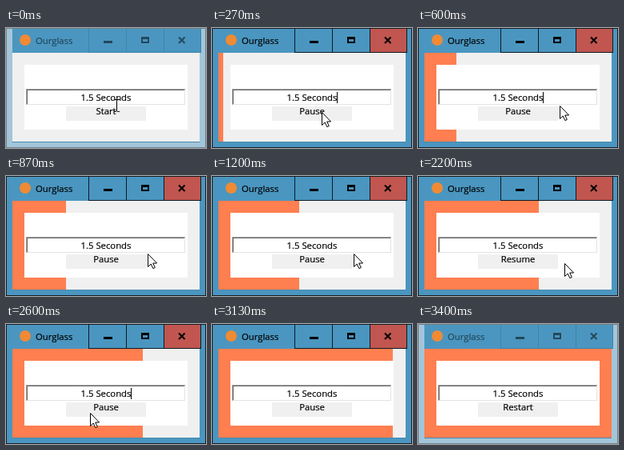
Write an HTML page that moves like this. It is 250 px wide and 150 px high and loops after 3540 ms.

```html
<!DOCTYPE html>
<html lang="en">
<head>
<meta charset="utf-8">
<title>Timer window</title>
<style>
  html, body { margin: 0; width: 100%; height: 100%; overflow: hidden; }
  svg { display: block; width: 100vw; height: 100vh; }
  text {
    font: 11.3px "Open Sans", "Noto Sans", sans-serif;
    fill: currentColor; stroke: currentColor; stroke-width: .2px;
  }
  .mid { text-anchor: middle; }
  .crisp { shape-rendering: crispEdges; }
  .line { fill: none; }
  #frame { fill: #4a96c0; }
  #close { fill: #c0564f; }
  #edge { stroke: #1e1e1e; }
  #seams { stroke: #0c1a22; }
  #glyphs { fill: none; stroke: #000; stroke-width: 2; }
  .idle #frame { fill: #a3c5d9; }
  .idle #close { fill: none; }
  .idle #edge { stroke: #70818b; }
  .idle #seams { stroke: #3f84aa; }
  .idle #glyphs { stroke: #24485c; }
  .idle #name { color: #24485c; }
</style>
</head>
<body>
<svg id="win" viewBox="0 0 250 150" preserveAspectRatio="none">
  <g class="crisp">
    <rect id="frame" width="250" height="150"/>
    <rect x="8" width="235" height="31" fill="#4a96c0"/>
    <rect id="close" x="197" width="46" height="30"/>
    <path id="seams" class="line" d="M103.5 0V30.5H243.5V0M150.5 0V30M197.5 0V30"/>
    <path class="line" stroke="#458bb0" d="M8 142.5H242"/>
    <rect id="edge" class="line" x=".5" y=".5" width="249" height="149"/>
  </g>
  <circle cx="24" cy="15" r="7" fill="#f08a35"/>
  <text id="name" x="37" y="20">Ourglass</text>
  <g id="glyphs">
    <path class="crisp" d="M122 17.5H133" stroke-width="3"/>
    <path class="crisp" d="M170 12H178V18H170ZM170 13H178"/>
    <path d="M216 11.5L223.5 19M223.5 11.5L216 19"/>
  </g>
  <g class="crisp">
    <rect x="8" y="31" width="234" height="111" fill="#f0f0f0"/>
    <rect id="bar" x="8" y="31" width="0" height="111" fill="#ff7f50"/>
    <rect x="23" y="46" width="204" height="81" fill="#fff"/>
    <rect x="75" y="98" width="100" height="18" fill="#f0f0f0"/>
    <path class="line" stroke="#a0a0a0" d="M25.5 96V76.5H224"/>
    <path class="line" stroke="#696969" d="M26.5 95V77.5H223"/>
    <path class="line" stroke="#e3e3e3" d="M26 95.5H223.5V77"/>
  </g>
  <text class="mid" x="125" y="91">1.5 Seconds</text>
  <rect id="caret" class="crisp" x="156" y="80" width="1" height="14"/>
  <text id="label" class="mid" x="125" y="108">Start</text>
  <path id="beam" class="crisp line" stroke="#000"
    d="M-3 -7.5H0M1 -7.5H4M.5 -7V7M-3 7.5H0M1 7.5H4"/>
  <path id="arrow" fill="#fff" stroke="#000" stroke-linejoin="round"
    d="M.5 .5V16.5L4.2 13L6.8 18.6L9.3 17.5L6.7 12H11.6Z"/>
</svg>
<script>
const LOOP = 3540, LAST = 3400, TICK = 200 / 3;
const START = 208, PAUSE = 1604, RESUME = 2398, BLUR = 3330;
const WIDTH = 234, SPEED = 0.1025, BLINK = 530, GLIDE = 260;

// Pointer stops, each with its arrival time.
const stops = [
  { at: 0, x: 138, y: 97 },
  { at: 200, x: 137, y: 105 },
  { at: 600, x: 177, y: 97 },
  { at: 1600, x: 137, y: 105 },
  { at: 1930, x: 193, y: 110 },
  { at: 2390, x: 137, y: 105 },
  { at: 2600, x: 105, y: 111 },
  { at: 2870, x: 50, y: 155 }
];

const $ = id => document.getElementById(id);
const show = (id, on) => $(id).setAttribute("visibility", on ? "visible" : "hidden");
const clamp = (v, lo, hi) => Math.min(hi, Math.max(lo, v));
const smooth = u => u * u * (3 - 2 * u);

// Steps fall on whole hundredths of a second.
const stepTime = k => Math.round(k * TICK / 10) * 10;
function snap(t) {
  const k = Math.round(t / TICK);
  return Math.min(LAST, stepTime(stepTime(k) > t ? k - 1 : k));
}

function pointerAt(t) {
  let { x, y } = stops[0];
  stops.slice(1).forEach((s, i) => {
    const from = Math.max(stops[i].at, s.at - GLIDE);
    const u = smooth(clamp((t - from) / (s.at - from), 0, 1));
    x += (s.x - x) * u;
    y += (s.y - y) * u;
  });
  return `translate(${Math.round(x)} ${Math.round(y)})`;
}

function filledAt(t) {
  const run = clamp(t, START, PAUSE) - START + Math.max(0, t - RESUME);
  return Math.min(WIDTH, Math.floor(run * SPEED));
}

function labelAt(t, filled) {
  if (t < START) return "Start";
  if (filled === WIDTH) return "Restart";
  return t > PAUSE && t < RESUME ? "Resume" : "Pause";
}

function draw(ms) {
  const t = snap(ms % LOOP);
  const active = t >= START && t < BLUR;
  const filled = filledAt(t);
  const typing = t < TICK;

  $("win").classList.toggle("idle", !active);
  $("bar").setAttribute("width", filled);
  $("label").textContent = labelAt(t, filled);
  show("caret", active && Math.floor((t - START) / BLINK) % 2 === 0);
  show("beam", typing);
  show("arrow", !typing && t < 2900);
  $(typing ? "beam" : "arrow").setAttribute("transform", pointerAt(t));
}

const began = performance.now();
function loop() {
  draw(performance.now() - began);
  requestAnimationFrame(loop);
}
loop();
</script>
</body>
</html>
```
